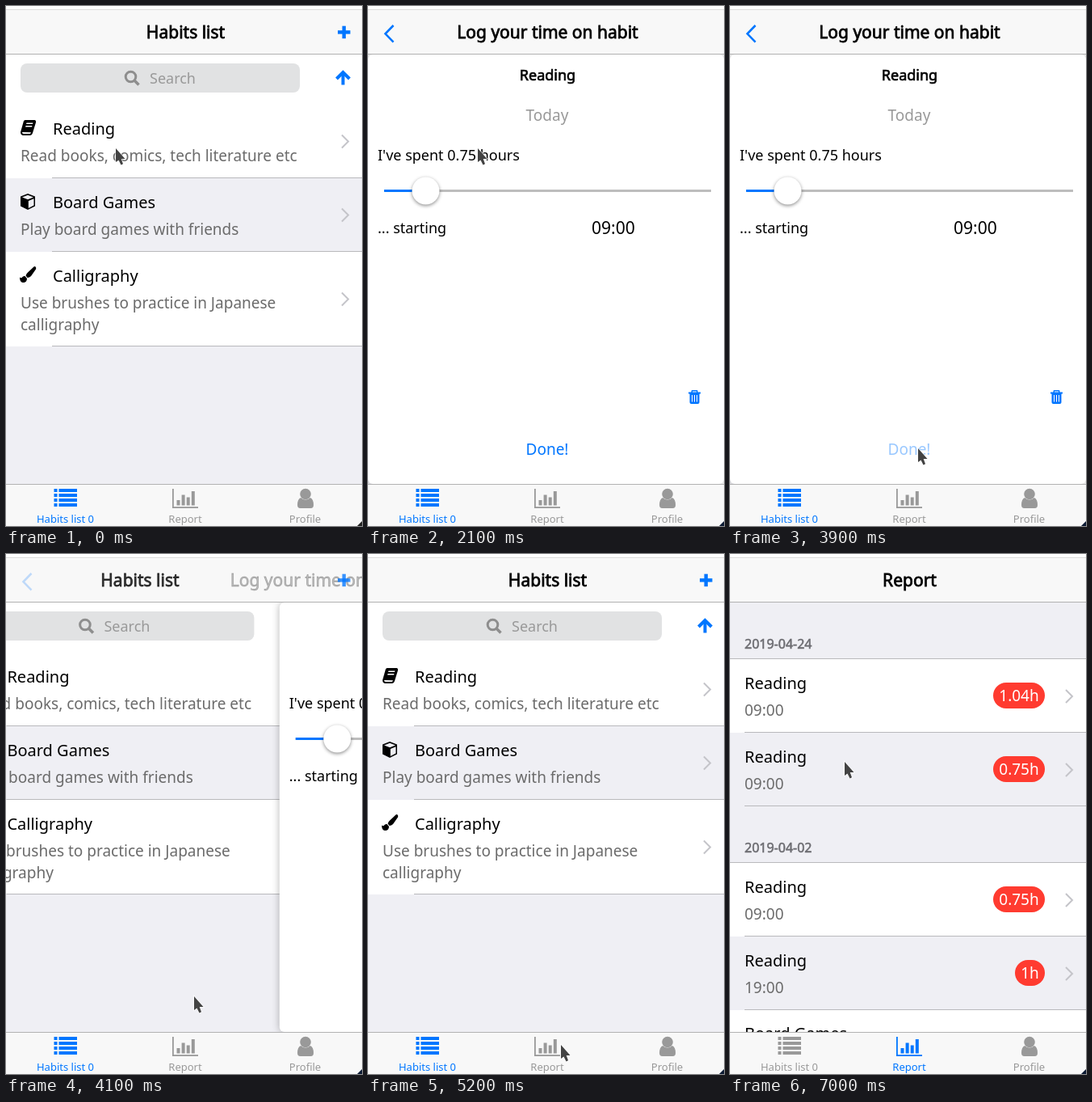
An HTML page with a canvas for the animation above (8000 ms loop, 441 px wide and 643 px high).

```html
<!DOCTYPE html>
<html lang="en">
<head>
<meta charset="utf-8">
<title>Habit tracker</title>
<style>
html, body { margin: 0; width: 100%; height: 100%; overflow: hidden; background: #fff; }
canvas { display: block; }
</style>
</head>
<body>
<canvas id="stage" width="441" height="643"></canvas>
<script>
const W = 441, H = 643, LOOP = 8000, STEP = 100;
const BLUE = '#0076ff', GREY = '#999', PALE = '#efeff4', BAR = '#f8f8f8', LINE = '#b9b9bc', SUB = '#6b6b6b';
const c = document.getElementById('stage').getContext('2d');

// Pointer track: time, x, y
const track = [
  [2100, 136, 176], [2200, 137, 215], [2300, 139, 262], [2400, 140, 293], [2900, 140, 293],
  [3000, 148, 325], [3200, 192, 450], [3400, 240, 575], [3500, 251, 598], [3600, 246, 580],
  [3800, 233, 547], [4600, 233, 547], [4900, 241, 585], [5200, 239, 607], [5300, 239, 607],
  [5800, 231, 609], [6200, 231, 609], [6400, 268, 560], [6600, 248, 506], [6700, 248, 506],
  [6900, 170, 315], [7000, 142, 257]
];

const icons = {
  book: new Path2D('M23.5 141H36Q37.5 142 37 144L33 157Q32 160 29.5 160H21Q18 159.5 18 156L22 142Z' +
    'M25.5 144.5L25 146H33L33.5 144.5ZM24.5 148L24 149.5H32L32.5 148ZM20 156Q19.8 158 22 158H30L31 156.3Z'),
  cube: new Path2D('M27 232L36 235.5V247.5L27 252L18 247.5V235.5Z' +
    'M27 233.8L20 236.5L27 239.2L34 236.5ZM27.8 241V250L34.5 246.6V238.3Z'),
  brush: new Path2D('M35 322Q38 322 37 325.5L31 334Q29 336 26.5 336L24.5 333.5Q25 331 27.5 329Z' +
    'M23.5 334L26 337Q26 342 21 342Q17 342 17 335.5Q19 337 20 335.5Q21 333.5 23.5 334Z'),
  user: new Path2D('M365 608Q371 613 377 608Q381 610 381 617Q381 621 377.5 621H364.5Q361 621 361 617Q361 610 365 608Z'),
  pointer: new Path2D('M0 0V17L3.5 14.5L6.5 20.5L9 19.2L6.7 13H11.5Z')
};

function rect(x, y, w, h, color) {
  c.fillStyle = color;
  c.fillRect(x, y, w, h);
}

function pill(x, y, w, h, r, color) {
  c.fillStyle = color;
  c.beginPath();
  c.roundRect(x, y, w, h, r);
  c.fill();
}

function disc(x, y, r, color) {
  pill(x - r, y - r, 2 * r, 2 * r, r, color);
}

function stroke(color, width, ...points) {
  c.strokeStyle = color;
  c.lineWidth = width;
  c.beginPath();
  points.forEach(([x, y]) => c.lineTo(x, y));
  c.stroke();
}

function text(s, x, y, size, color = '#000', align = 'left', bold = false) {
  c.font = size + 'px "Noto Sans", sans-serif';
  c.textAlign = align;
  c.fillStyle = c.strokeStyle = color;
  c.fillText(s, x, y);
  if (bold) {
    c.lineWidth = size / 27;
    c.strokeText(s, x, y);
  }
}

function icon(name, color) {
  c.fillStyle = color;
  c.fill(icons[name], 'evenodd');
}

function shifted(dx, alpha, draw) {
  c.save();
  c.translate(dx, 0);
  c.globalAlpha = alpha;
  draw();
  c.restore();
}

function chevron(y) {
  stroke('#c4c4c9', 2, [416, y - 8], [424, y], [416, y + 8]);
}

// cubic-bezier(.3, .4, 0, .9)
function ease(x) {
  if (x <= 0) return 0;
  if (x >= 1) return 1;
  let lo = 0, hi = 1, t;
  for (let i = 0; i < 24; i++) {
    t = (lo + hi) / 2;
    if (.9 * (1 - t) ** 2 * t + t ** 3 < x) lo = t; else hi = t;
  }
  return 1.2 * (1 - t) ** 2 * t + 2.7 * (1 - t) * t * t + t ** 3;
}

function pointerAt(time) {
  const i = track.findIndex(k => k[0] > time);
  if (i < 1) return (i ? track[track.length - 1] : track[0]).slice(1);
  const [t0, x0, y0] = track[i - 1], [t1, x1, y1] = track[i];
  const k = (time - t0) / (t1 - t0);
  return [x0 + (x1 - x0) * k, y0 + (y1 - y0) * k];
}

function habit(top, height, name, lines, glyph, color) {
  rect(0, top, W, height, color);
  rect(57, top + height - 1, W - 57, 1, LINE);
  icon(glyph, '#000');
  text(name, 58, top + 37, 20);
  lines.forEach((s, i) => text(s, 18, top + 70 + 27 * i, 19, SUB));
  chevron(top + (height - 1) / 2 + .5);
}

function listPage() {
  rect(0, 60, W, 531, PALE);
  rect(0, 60, W, 62, '#fff');
  pill(18, 71, 346, 36, 8, '#e1e2e3');
  c.strokeStyle = '#8e8e8e';
  c.lineWidth = 3;
  c.beginPath();
  c.arc(154.5, 87.5, 6.3, 0, 7);
  c.stroke();
  stroke('#8e8e8e', 3.6, [159, 92], [164.5, 97.5]);
  text('Search', 178, 96, 18, GREY);
  stroke(BLUE, 4, [409.5, 90], [417.5, 82], [425.5, 90]);
  stroke(BLUE, 4, [417.5, 82], [417.5, 97.5]);
  habit(122, 91, 'Reading', ['Read books, comics, tech literature etc'], 'book', '#fff');
  habit(213, 91, 'Board Games', ['Play board games with friends'], 'cube', PALE);
  habit(304, 117, 'Calligraphy', ['Use brushes to practice in Japanese', 'calligraphy'], 'brush', '#fff');
}

function detailPage(pressed) {
  c.save();
  c.shadowColor = 'rgba(0,0,0,.3)';
  c.shadowBlur = 10;
  pill(0, 60, W, 531, 6, '#fff');
  c.restore();
  text('Reading', 222.5, 92, 18, '#000', 'center', true);
  text('Today', 222, 142, 19, GREY, 'center');
  text("I've spent 0.75 hours", 12, 191, 18);
  rect(20, 227, 405, 3, '#bdbdbd');
  rect(20, 227, 51, 3, BLUE);
  c.save();
  c.shadowColor = 'rgba(0,0,0,.45)';
  c.shadowBlur = 4;
  c.shadowOffsetY = 1.5;
  disc(71.5, 228.5, 17, '#fff');
  c.restore();
  text('... starting', 12, 281, 18);
  text('09:00', 277, 282, 21);
  stroke(BLUE, 1.5, [401, 478], [401.5, 475.8], [407.5, 475.8], [408, 478]);
  rect(397, 477.5, 15, 2, BLUE);
  pill(398.5, 479, 12, 13, [0, 0, 2, 2], BLUE);
  for (const x of [401, 404, 407]) rect(x, 481, 1, 8.5, '#fff');
  shifted(0, pressed ? .4 : 1, () => text('Done!', 222, 555, 19, BLUE, 'center'));
}

function entry(top, hours, time, left, color) {
  rect(0, top, W, 91, color);
  rect(18, top + 90, W - 18, 1, LINE);
  text('Reading', 18, top + 37, 20);
  text(time, 18, top + 70, 19, SUB);
  pill(left, top + 29, 390 - left, 32, 16, '#ff3b30');
  text(hours, (left + 390) / 2, top + 52, 19, '#fff', 'center');
  chevron(top + 46);
}

function reportPage() {
  rect(0, 60, W, 531, PALE);
  for (const [date, top] of [['2019-04-24', 130], ['2019-04-02', 382]]) {
    text(date, 18, top - 13, 16, '#6d6d72', 'left', true);
    rect(0, top - 1, W, 1, LINE);
  }
  entry(130, '1.04h', '09:00', 326, '#fff');
  entry(221, '0.75h', '09:00', 326, PALE);
  entry(382, '0.75h', '09:00', 326, '#fff');
  entry(473, '1h', '19:00', 353, PALE);
  rect(0, 564, W, 27, '#fff');
  text('Board Games', 18, 600, 20);
}

function title(s) {
  text(s, 222.5, 40, 21, '#000', 'center', true);
}

function header(report, open, listShift, titleShift) {
  rect(0, 0, W, 4, '#fff');
  rect(0, 4, W, 1, '#dcdcdc');
  rect(0, 5, W, 54, BAR);
  rect(0, 59, W, 1, '#b2b2b2');
  if (report) return title('Report');
  shifted(-listShift, 1 - open, () => title('Habits list'));
  shifted(titleShift, open, () => title('Log your time on habit'));
  shifted(0, open, () => stroke(BLUE, 2.6, [31.5, 24], [21.5, 34.3], [31.5, 44.6]));
  shifted(0, 1 - open, () => {
    rect(411, 30.2, 15.5, 4.4, BLUE);
    rect(416.5, 24.7, 4.4, 15.5, BLUE);
  });
}

function tabs(report) {
  const first = report ? GREY : BLUE, second = report ? BLUE : GREY;
  rect(0, 591, W, 1, '#b2b2b2');
  rect(0, 592, W, 51, BAR);
  for (let y = 597; y < 620; y += 6) {
    rect(59.5, y, 4, 4, first);
    rect(65.5, y, 22.5, 4, first);
  }
  rect(206, 597, 1.8, 24, second);
  rect(206, 619.2, 32, 1.8, second);
  [6.5, 13, 10, 17.5].forEach((h, i) => rect(211.5 + 6.1 * i, 617.5 - h, 4, h, second));
  icon('user', GREY);
  disc(371, 603.5, 6.8, GREY);
  text('Habits list 0', 73.5, 639, 13, first, 'center');
  text('Report', 222, 639, 13, second, 'center');
  text('Profile', 370.5, 639, 13, GREY, 'center');
}

function render(time) {
  const report = time >= 6000, pushing = time < 3900;
  let open = 0;
  if (time >= 1800 && time < 4000) open = ease((time - 1686) / 400);
  else if (time >= 4000 && time < 4300) open = 1 - ease((time - 3962) / 400);
  const listShift = (pushing ? 214 : 244) * open;
  const titleShift = (pushing ? 242 : 218) * (1 - open);

  c.clearRect(0, 0, W, H);
  c.save();
  c.beginPath();
  c.rect(0, 60, W, 531);
  c.clip();
  if (report) reportPage();
  else {
    shifted(-listShift, 1, listPage);
    if (open) shifted(W * (1 - open), 1, () => detailPage(time >= 3900));
  }
  c.restore();
  header(report, open, listShift, titleShift);
  tabs(report);

  c.fillStyle = time < 1100 ? '#222' : '#0c1a33';
  c.beginPath();
  c.moveTo(W, 637);
  c.lineTo(W, H);
  c.lineTo(435, H);
  c.fill();

  c.save();
  c.translate(...pointerAt(time));
  c.strokeStyle = 'rgba(255,255,255,.8)';
  c.lineWidth = 1.5;
  c.stroke(icons.pointer);
  icon('pointer', '#434343');
  c.restore();
}

const start = performance.now();
function tick() {
  const time = (performance.now() - start) % LOOP;
  render(Math.floor(time / STEP) * STEP);
  requestAnimationFrame(tick);
}
tick();
</script>
</body>
</html>
```
